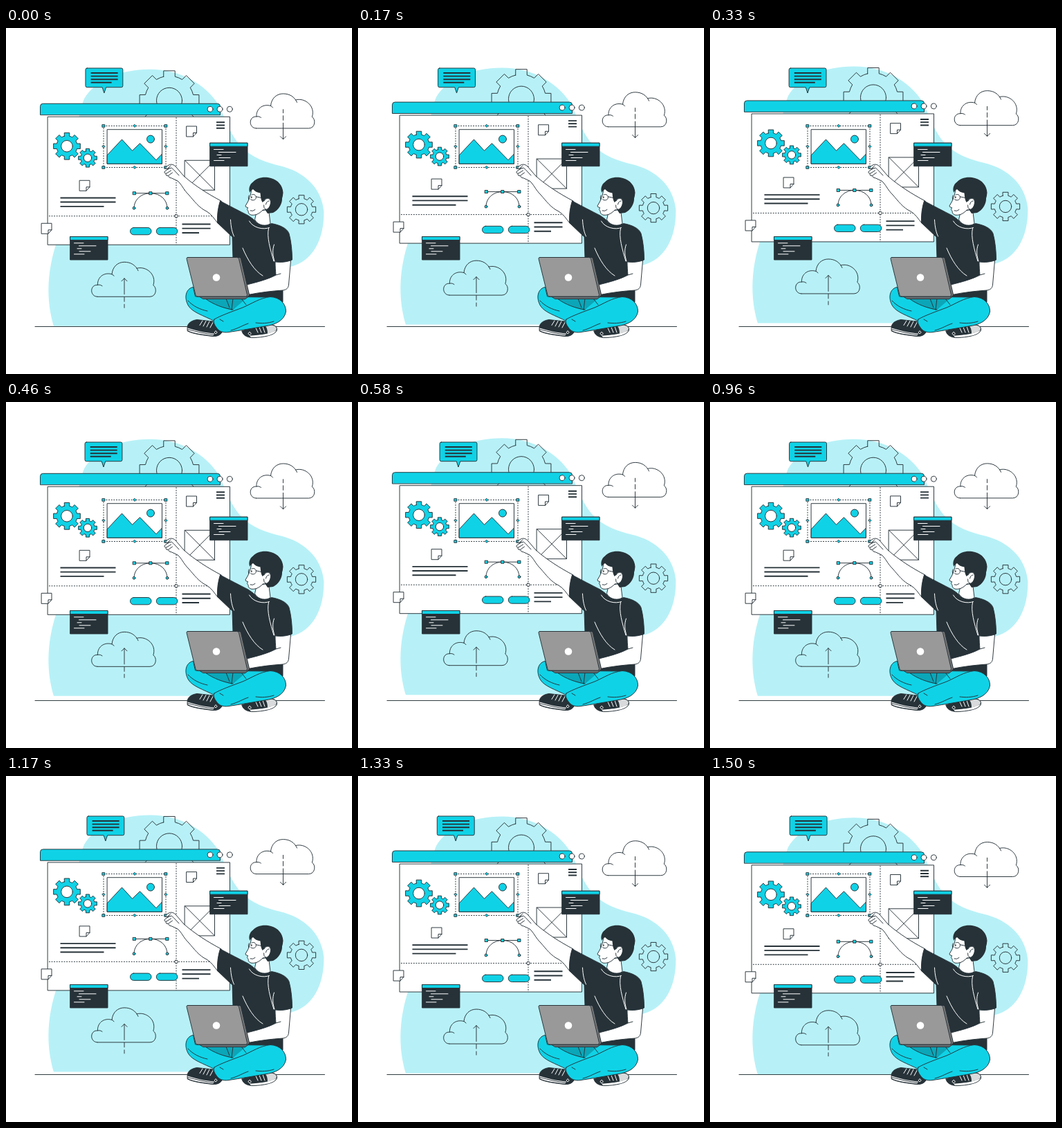
Write an HTML page that moves like this. It is 500 px wide and 500 px high and loops after 1.54 s.

```html
<!DOCTYPE html>
<html lang="en">
<head>
<meta charset="utf-8">
<title>Web design at work</title>
<style>
html, body { margin: 0; width: 100%; height: 100%; overflow: hidden; background: #fff; }
svg { display: block; width: 100vw; height: 100vh; }
.ln { fill: none; stroke: #263238; stroke-width: .95; stroke-linecap: round; stroke-linejoin: round; }
.w { fill: #fff; }
.c { fill: #10d2e6; }
.d { fill: #263238; }
.thick { stroke-width: 1.9; stroke-linecap: butt; }
.dots { stroke-width: 1; stroke-dasharray: 1.8 1.8; stroke-linecap: butt; }
.lite { fill: none; stroke: #fff; stroke-width: 1; stroke-linecap: round; stroke-linejoin: round; }
</style>
</head>
<body>
<svg viewBox="0 0 500 500">
  <defs>
    <path id="cloud" d="M8.500 50C-2.500 50-3 32.500 9 33C12 32.500 14 33.300 15.500 34.500M9 33C8 23 17 14 29.500 17.500Q31.500 18.500 32.500 20M29.500 17.500C30.500 6 38.500 0 47.500 0C57 0 64 4.500 67.500 12.500M65.500 9C79 5 94.500 18 89.300 33.500C95 37 94 50 84.500 50H8.500"/>
    <g id="note">
      <path class="ln w" d="M0 0H14.500V9.500L9.500 15H0Z"/>
      <path class="ln" d="M14.500 9.500H9.500V15"/>
    </g>
    <g id="code">
      <rect class="ln d" width="54" height="33.500"/>
      <rect class="ln c" width="54" height="5"/>
      <path class="lite" d="M5.500 9.300H19M12.500 13.300H37M10 17.300H16M13 21.300H29M5.500 25.300H20"/>
    </g>
  </defs>

  <g id="float">
    <path fill="#b7f1f7" d="M69 431.500C62 408 55 368 72 314C86 264 93 232 98 192C101 154 104 126 113 103C128 77 164 60.500 208 60.500C254 61 287 82 306 110C319 135 324 158 345 177C362 192 385 197 402 201.500C437 212 457 237 459.300 266C460 306 443 338 412 345.500C382 354 373 396 350 431.500Z"/>
    <path id="gearBack" class="ln"/>
    <circle class="ln" cx="236" cy="105.500" r="18.500"/>
    <path class="ln c" d="M49.500 126V114Q49.500 110 53.500 110H305.500Q309.500 110 309.500 114V126Z"/>
    <rect class="ln w" x="60.500" y="129" width="263" height="185"/>
    <g class="ln w">
      <circle cx="295" cy="118" r="4"/><circle cx="309" cy="118" r="4"/><circle cx="323.300" cy="118" r="4"/>
    </g>
    <path class="ln thick" d="M304 137H316M304 141.200H316M304 145.500H316M78.500 246.200H158.500M78.500 252.300H158.500M78.500 258.600H141.500M254.500 284.200H295.500M254.500 290.400H295.500M254.500 296.700H279"/>
    <path class="ln dots" d="M246 130V314M62 272.500H323"/>
    <rect class="ln w" x="244" y="270.500" width="4" height="4" rx="1"/>
    <path id="gearA" class="ln c"/><circle class="ln w" cx="88" cy="171.500" r="8.300"/>
    <path id="gearB" class="ln c"/><circle class="ln w" cx="118" cy="188.500" r="5.700"/>
    <path class="ln" d="M258.500 192H301.500V235H258.500ZL301.500 235M301.500 192L258.500 235"/>
    <use href="#note" x="261" y="142.700"/>
    <use href="#note" x="106.500" y="221"/>
    <use href="#note" x="51.500" y="283"/>
    <rect class="ln c" x="179.500" y="289.200" width="30.500" height="10.300" rx="5.100"/>
    <rect class="ln c" x="217.300" y="289.200" width="30.500" height="10.300" rx="5.100"/>
    <path class="ln" d="M185.500 239.500H233M185 261C185 249 195 239.500 209 239.500S233 249 233 261"/>
    <g class="ln c">
      <path d="M183.500 237.500h4v4h-4zM207 237.500h4v4h-4zM231 237.500h4v4h-4z"/>
      <circle cx="185" cy="261" r="1.900"/><circle cx="233" cy="261" r="1.900"/>
    </g>
    <use href="#cloud" class="ln" x="353" y="95.700"/>
    <use href="#cloud" class="ln" x="123.500" y="339"/>
    <path class="ln" d="M400.500 118.500V123.500M400.500 127.500V134M400.500 138V161.500M396.500 157.500L400.500 161.500L404.500 157.500"/>
    <path class="ln" d="M171 405V400M171 396V389.500M171 385.500V362.500M167 366.500L171 362.500L175 366.500"/>
    <path id="gearR" class="ln"/><circle class="ln" cx="427" cy="263" r="8.700"/>
  </g>

  <g id="bubble">
    <path class="ln c" d="M117.500 58H167Q169.200 58 169.200 60.200V83.500Q169.200 85.700 167 85.700H145L142.200 94L139.500 85.700H117.500Q115.300 85.700 115.300 83.500V60.200Q115.300 58 117.500 58Z"/>
    <path class="ln thick" d="M123 65H162M123 69.600H162M123 74.200H162M123 78.700H153"/>
  </g>

  <rect class="ln dots" x="141" y="141.500" width="90" height="60"/>
  <rect class="ln w" x="146.500" y="146.700" width="79" height="49.500"/>
  <path class="ln c" d="M146.500 183.500L167.500 161L182.500 177.300L193.500 166.700L217 190.800L225.500 182V196.200H146.500Z"/>
  <circle class="ln c" cx="209" cy="160.600" r="5.500"/>
  <path id="grips" class="ln c"/>
  <use href="#code" x="93" y="301.500"/>
  <use href="#code" x="295" y="166.200"/>
  <path class="ln" d="M42 431.500H460.500"/>

  <g id="man">
    <!-- raised arm -->
    <path class="ln w" d="M311 250C292 240 273 228 257 214L245 200C241 196 236 196 231.500 201Q230 203.500 233 203.500L236.500 202.500L229.500 207Q228 210 231.500 210.300L231 211.500Q231 214 234.500 213.500Q235.500 217 239.500 217L248 221C254 226 256 233 264 241C272 250 279 260 290 265C297 269 301 276 306 282Z"/>
    <path class="ln" d="M236.500 202.500Q240 201 242 204.500L250 213M231.500 210.300L238.500 206M234.500 213.500L240.500 209M233 203.500L238 199"/>

    <!-- shoes -->
    <path class="ln d" d="M262 434C261.500 426 269 422.500 276 421.500L299 424C305 428 310 433 313 438C311 443 306 446 299 445.500C285 444 270 442 262.500 438Z"/>
    <path class="w" d="M262.500 433.500C273 437 288 440.500 301 441.500L299.500 444.500C285 443 270 441 263 437Z"/>
    <path class="ln" d="M263 435.500C276 439 288 442 300 443"/>
    <path class="lite" d="M284 423L280 429.500M289 423.500L285 431M294 424L290 432M299 425.500L295 433M303 438a1.800 1.800 0 1 0 .2 0"/>
    <path class="ln d" d="M341 438C349 434 366 431 377 429.500C385 427.500 392 430 391.500 436C391 442 378 447 356 447.500C348 447 342 444 341 438Z"/>
    <path fill="#d8dadb" d="M375 431C384 427.500 391 430.500 391 435C389 439 384 440.500 378 441.500C378 437 377 433 375 431Z"/>
    <path class="w" d="M391 436C388 441 367 444 352 444.500L354 447C374 447 390 443 391 436Z"/>
    <path class="lite" d="M361 433.500L364 440M366 432.500L369 440M371 431.500L374 440M352 439.500a2 2 0 1 0 .2 0"/>

    <!-- shirt -->
    <path class="ln d" d="M309.500 250C323 257 338 265 350 271L357 276C365 285 377 287 383.500 282.500C395 284.500 406 289 409 297C412 308 413.500 322 413.500 335C407 338.500 397 339 388 337.500L400 372V396L330 394L327 302L305.500 281.500C305 270 306.500 259 309.500 250Z"/>
    <path class="lite" d="M351.500 279C357 289 372 292 380.500 288.500M342 318C349 335 359 351 371 358M379.500 289.500C376.500 302 382 320 387 337M387.500 313C384.500 321 385.500 329 388 337M324.500 277C325 288 327 296 329.500 301"/>

    <!-- legs -->
    <path class="ln c" d="M270 374.500C259 377 257 391 264 402C270 411 284 415 302 424C318 434 340 438 354 434L398 404L381 389L274 388Z"/>
    <path fill="#0ba6b8" d="M288 391H347L327 408C314 405 300 399 288 391Z"/>
    <path class="ln" d="M288 391C300 400 315 405 328 407M318 391L323 404M328 391L326 407M340 391L347 400"/>
    <path class="ln c" d="M301 421C309 416 326 410 342 404C356 398 367 390 382 388.500C396 389 405 399 404.500 410C402 423 389 429 374 431C356 434 339 437 322 439.500C313 441 307 438 303.500 432C300.500 428 299.500 424 301 421Z"/>
    <path class="ln" d="M309 421L314 424M325 437C336 434 341 430 350 427M387 424C378 427 369 427 361 426M263 394C270 402 281 407 291 409"/>

    <!-- resting arm -->
    <path class="ln w" d="M389 338C389 345 389.500 351 390 357C379 363 364 367 348 371L350 385.500C367 382 385 380 400 379C405 378.500 408 376 408.500 371L411.500 336C404 338.500 396 339 389 338Z"/>
    <path class="ln" d="M390 357L397 355"/>

    <!-- laptop -->
    <path class="ln" style="fill:#697073" d="M279 387.500H351L346 391.500H285Z"/>
    <path class="ln" style="fill:#777" d="M263 331.500H337Q339 331.500 339.500 333.500L351.500 385Q351.500 388 349 388H276Z"/>
    <path class="ln" style="fill:#999" d="M262.500 331.500H333.500Q336 331.500 336.500 333.500L348.500 385.500Q348.500 388 346.500 388H277Q274.500 388 274 386L261 333.500Q260.800 331.500 262.500 331.500Z"/>
    <circle class="w" cx="304" cy="360.500" r="5.300"/>

    <!-- head -->
    <path class="ln w" d="M362 266L359.500 277C364 286 377 287 382 282.500L379.500 262Z"/>
    <path class="ln w" d="M355 233C354 240 352 246 349.500 251L346 257Q345.500 259 349.500 259.500L348.500 262.500L350 264.500Q350 269.500 355 270.300C362 270.800 367 267.500 371 263L383 262L384 232Z"/>
    <path class="d" d="M352.500 238C350 234 351.500 226 357 222.500C362 216 374 214 383 217C393 219.500 400 228 400.500 238C400 241 400 244 399 246C399.500 254 394 263 386 267L378 268L374 262C378 262 382 257 382.500 251C382 245 376 244 373 250L370.500 252C368 248 368 243 367.500 238.500C363 238 359.500 236 357 233C354.500 234 353 236 352.500 238Z"/>
    <path class="ln w" d="M373 250C375.500 244.500 382.500 245 382.500 252C382 258 378.500 263 375 262Q372 260 372.500 256"/>
    <path class="ln" d="M375.500 255Q376.500 250 380 250M353 264Q357 265.500 360 262.500M355 241C359.500 239 362.500 243 361 246.500C359.500 249.500 355 249.500 353.500 247.500M361.500 243.800L371.500 246M351 242Q349.500 245 350.800 248"/>
    <ellipse class="d" cx="354.800" cy="244.500" rx=".8" ry="1.600"/>
  </g>
</svg>
<script>
const $ = id => document.getElementById(id);
const LOOP = 1540, FPS = 24, LEAD = 56;

// Eight straight teeth; a and b are half-angles at root and tip.
function gear(id, cx, cy, tip, root, a, b) {
  const at = (r, deg) => {
    const q = deg * Math.PI / 180;
    return (cx + r * Math.sin(q)).toFixed(2) + ' ' + (cy - r * Math.cos(q)).toFixed(2);
  };
  let d = '';
  for (let k = 0; k < 360; k += 45) {
    d += (k ? `A${root} ${root} 0 0 1 ` : 'M') + at(root, k - a) +
      'L' + at(tip, k - b) + 'L' + at(tip, k + b) + 'L' + at(root, k + a);
  }
  $(id).setAttribute('d', d + `A${root} ${root} 0 0 1 ${at(root, -a)}Z`);
}
gear('gearBack', 236, 105.5, 43.7, 35.5, 13.5, 10.8);
gear('gearA', 88, 171.5, 19.7, 15, 14, 11);
gear('gearB', 118, 188.5, 13.6, 10.2, 14, 11);
gear('gearR', 427, 263, 21, 16, 14, 11);

let grips = '';
for (const x of [141, 231]) {
  for (const y of [141.5, 201.5]) grips += `M${x - 1.8} ${y - 1.8}h3.6v3.6h-3.6z`;
}
for (const [x, y] of [[186, 141.5], [231, 171.3], [186, 201.5], [141, 171.3]]) {
  grips += `M${x} ${y - 2}l2 2l-2 2l-2-2z`;
}
$('grips').setAttribute('d', grips);

// Offsets at every tenth of the loop, joined linearly.
const SHAKE = [0, -1, 2, -4, 4, -4, 4, -4, 2, -1, 0];

function draw(ms) {
  const step = Math.floor((ms % LOOP + 5) * FPS / 1000);
  const p = ((step * 1000 / FPS + LEAD) / LOOP) % 1;
  const dy = -10 * (1 - Math.abs(1 - 2 * p));
  const i = Math.floor(p * 10);
  const dx = SHAKE[i] + (SHAKE[i + 1] - SHAKE[i]) * (p * 10 - i);
  $('float').setAttribute('transform', `translate(0 ${dy.toFixed(3)})`);
  $('bubble').setAttribute('transform', `translate(${dx.toFixed(3)} 0)`);
}

let start;
function tick(now) {
  if (start === undefined) start = now;
  draw(now - start);
  requestAnimationFrame(tick);
}
draw(0);
requestAnimationFrame(tick);
</script>
</body>
</html>
```
